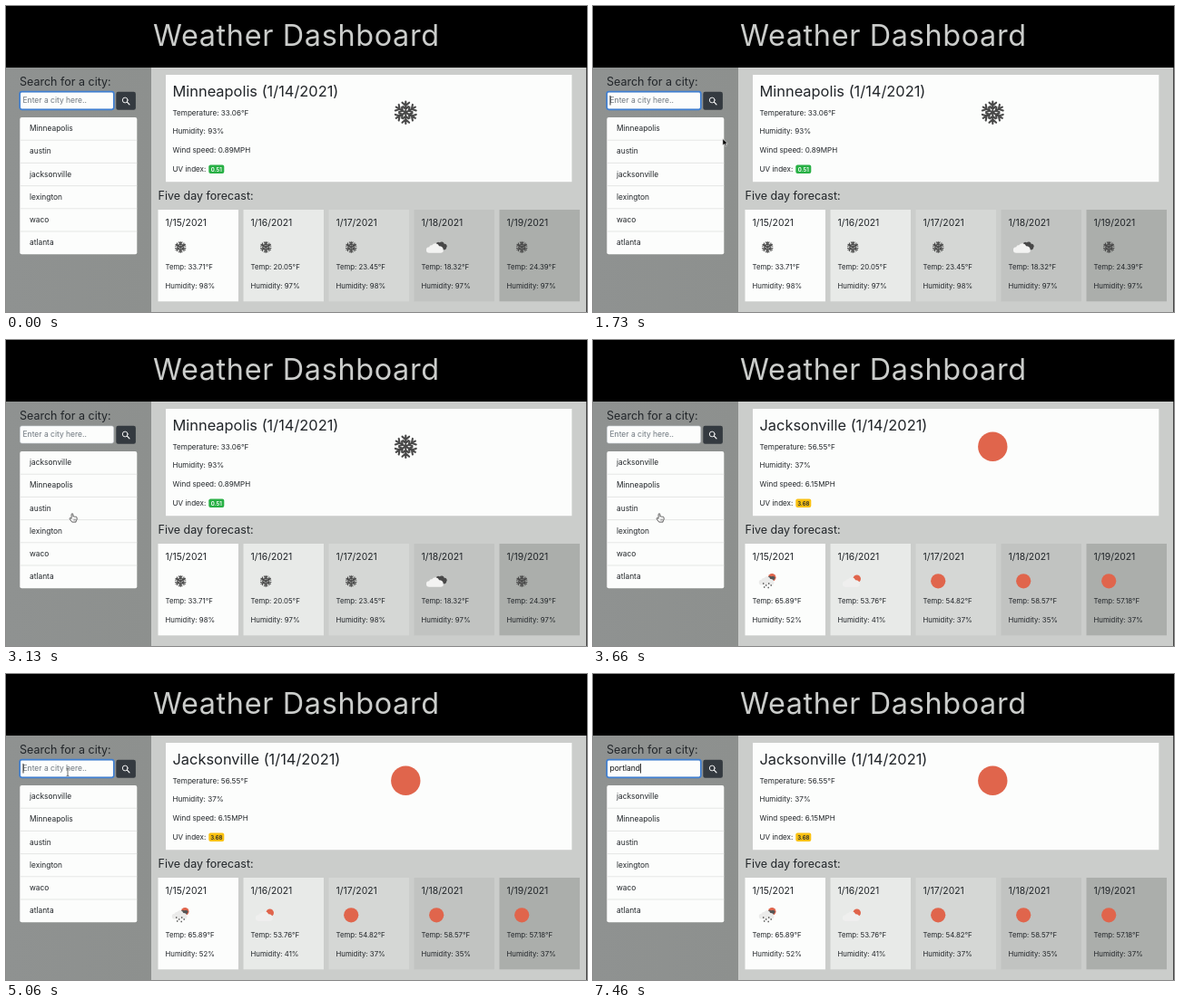
An HTML page for the animation above (8000 ms loop, 640 by 338 pixels).

```html
<!DOCTYPE html>
<html lang="en">
<head>
<meta charset="utf-8">
<title>Weather Dashboard</title>
<style>
html, body { margin: 0; width: 100%; height: 100%; overflow: hidden; background: #cbcdcb; }
svg { display: block; width: 640px; height: 338px; }
text { font-family: Inter, "Open Sans", sans-serif; font-size: 8.1px; fill: #212529; white-space: pre; }
.title { font-size: 32.4px; letter-spacing: .02em; fill: #cbcdcb; }
.city { font-size: 16.4px; }
.head { font-size: 12.5px; }
.date { font-size: 10.4px; }
.item { font-size: 8.4px; }
.day { font-size: 7.8px; }
.badge { font-size: 6.1px; font-weight: 600; text-anchor: middle; }
.hint { fill: #6c757d; font-size: 8.5px; }
.field { fill: #111; font-size: 8.5px; }
</style>
</head>
<body>
<svg viewBox="0 0 640 338">
  <defs>
    <linearGradient id="shade">
      <stop offset="0" stop-color="#8f9291"/><stop offset="1" stop-color="#8d908e"/>
    </linearGradient>
    <g id="snow" fill="none" stroke="#484848" stroke-width="2.1" stroke-linecap="round"></g>
    <circle id="sun" r="16.2" fill="#e0654c"/>
    <path id="cloud" d="M-16 13a6.5 6.5 0 0 1 0-13a5 5 0 0 1 6-4a9 9 0 0 1 16 2a8 8 0 0 1 9 8a6 6 0 0 1-5 7z"/>
    <g id="clouds">
      <path d="M-1-7a5 5 0 0 1 8-3a6 6 0 0 1 10 3a5 5 0 0 1 5 8a5 5 0 0 1-6 5h-9z" fill="#484848"/>
      <use href="#cloud" fill="#f3f3f2"/>
    </g>
    <g id="partly">
      <circle cx="9" cy="-5" r="8.6" fill="#e0654c"/>
      <use href="#cloud" fill="#efefee"/>
    </g>
    <g id="rain">
      <circle cx="10" cy="-8" r="8.6" fill="#e0654c"/>
      <path d="M1-9a6 6 0 0 1 8-1a5 5 0 0 1 8 3l-4 6h-10z" fill="#555"/>
      <use href="#cloud" fill="#ebebea" transform="translate(1 -3) scale(.88)"/>
      <path d="M-9 4v3M-3 8v3M3 4v3M-7 12v3M2 13v3M8 8v3" stroke="#484848" stroke-width="2.6"/>
    </g>
  </defs>

  <rect width="640" height="338" fill="#cbcdcb"/>
  <rect y="68" width="160" height="270" fill="url(#shade)"/>
  <rect width="640" height="68" fill="#000"/>
  <rect x="639" y="68" width="1" height="270" fill="#444"/>
  <text class="title" x="162" y="43.5">Weather Dashboard</text>

  <text class="head" x="15" y="87.5">Search for a city:</text>
  <rect x="15.5" y="95" width="103" height="19" rx="2" fill="#fcfdfc" stroke="#ced4da" stroke-width=".6"/>
  <rect id="ring" x="15.2" y="94.7" width="103.6" height="19.6" rx="2.2" fill="none" stroke="#3f7fd2" stroke-width="1.7"/>
  <text class="hint" id="hint" x="18.5" y="107.2">Enter a city here..</text>
  <text class="field" id="field" x="18.5" y="107.2"></text>
  <rect id="caret" y="99" width=".8" height="10.5" fill="#000"/>
  <rect x="121.3" y="94.7" width="21.6" height="20" rx="2.2" fill="#343a40"/>
  <g fill="none" stroke="#fff" stroke-width=".9" stroke-linecap="round">
    <circle cx="131.2" cy="104" r="2.9"/><path d="M133.4 106.2l2.6 2.6" stroke-width="1.2"/>
  </g>

  <rect x="15.3" y="123" width="129" height="151.3" rx="2" fill="#fcfdfc"/>
  <g id="list"></g>

  <rect x="176" y="76" width="447.3" height="118.2" fill="#fcfdfc"/>
  <g id="now"></g>
  <text class="head" x="167.5" y="213.8">Five day forecast:</text>
  <g id="days"></g>

  <g id="arrow"><path d="M0 0v7.4l1.8-1.6l1.2 2.6l1.3-.6l-1.2-2.5h2.4z" fill="#000" stroke="#fff" stroke-width=".6"/></g>
  <g id="hand">
    <path d="M-.9.8q.9-1.3 1.8 0v2.8q.8-.6 1.5.1q.8-.5 1.4.2q1-.3 1.3.7v2q-.3 1.3-1 2v1h-4.4l-2.5-3.4q-.4-1.2.6-1.2l1.3.9z" fill="#fff" stroke="#222" stroke-width=".7"/>
    <path d="M1.2 6v2M2.5 6v2M3.7 6v2" stroke="#222" stroke-width=".4"/>
  </g>
  <path id="beam" d="M-1.4-4.2q1.4 0 1.4 1v6.4q0 1-1.4 1M1.4-4.2q-1.4 0-1.4 1M0 3.2q0 1 1.4 1" fill="none" stroke="#333" stroke-width=".7"/>
</svg>
<script>
const $ = id => document.getElementById(id);
const LOOP = 8000;

const cities = [
  ['Minneapolis', 'austin', 'jacksonville', 'lexington', 'waco', 'atlanta'],
  ['jacksonville', 'Minneapolis', 'austin', 'lexington', 'waco', 'atlanta']
];
const reports = [
  { city: 'Minneapolis', temp: '33.06', hum: 93, wind: '0.89', uv: '0.51', tag: '#28b045', ink: '#fff', icon: 'snow',
    days: [['snow', '33.71', 98], ['snow', '20.05', 97], ['snow', '23.45', 98], ['clouds', '18.32', 97], ['snow', '24.39', 97]] },
  { city: 'Jacksonville', temp: '56.55', hum: 37, wind: '6.15', uv: '3.68', tag: '#fac111', ink: '#212529', icon: 'sun',
    days: [['rain', '65.89', 52], ['partly', '53.76', 41], ['sun', '54.82', 37], ['sun', '58.57', 35], ['sun', '57.18', 37]] }
];
const shades = ['#fcfdfc', '#e8eae8', '#d5d7d5', '#c1c3c1', '#abaeab'];

const text = (x, y, s, cls = '', extra = '') => `<text class="${cls}" x="${x}" y="${y}" ${extra}>${s}</text>`;
const icon = (id, x, y, k = 1) => `<use href="#${id}" transform="translate(${x} ${y}) scale(${k})"/>`;

// Six-armed snowflake
$('snow').innerHTML = [0, 60, 120, 180, 240, 300].map(a =>
  `<path d="M0 0V-12.2M-3.8-11l3.8 3.4l3.8-3.4M-3-6.6l3 2.7l3-2.7" transform="rotate(${a})"/>`).join('');

const listView = names => names.map((n, i) =>
  text(26, 138.2 + i * 25.2, n, 'item') +
  (i ? `<path d="M15.3 ${123 + i * 25.2}h129" stroke="#dcdddc" stroke-width=".7"/>` : '')).join('');

const nowView = (r, pic) =>
  text(183.5, 100, `${r.city} (1/14/2021)`, 'city') +
  text(183.5, 120.8, `Temperature: ${r.temp}°F`) +
  text(183.5, 141.4, `Humidity: ${r.hum}%`) +
  text(183.5, 162, `Wind speed: ${r.wind}MPH`) +
  text(183.5, 182.6, 'UV index:') +
  `<rect x="223.3" y="175.6" width="17" height="9.4" rx="2" fill="${r.tag}"/>` +
  text(231.8, 182.5, r.uv, 'badge', `style="fill:${r.ink}"`) +
  icon(pic, 440.3, 117.7);

const daysView = (r, pics) => shades.map((fill, i) => {
  const x = 167.5 + i * 94, [, temp, hum] = r.days[i];
  return `<rect x="${x}" y="225" width="88.5" height="101.3" fill="${fill}"/>` +
    text(x + 8, 243, `1/${15 + i}/2021`, 'date') +
    icon(pics.days[i][0], x + 24.7, 266.3, .5) +
    text(x + 8, 291.2, `Temp: ${temp}°F`, 'day') +
    text(x + 8, 312, `Humidity: ${hum}%`, 'day');
}).join('');

const drawn = {};
function put(id, key, view) {
  if (drawn[id] !== key) { drawn[id] = key; $(id).innerHTML = view(); }
}
const show = (id, on) => $(id).setAttribute('visibility', on ? 'visible' : 'hidden');

// Pointer path: time, x, y
const path = [
  [930, 100, 110], [1260, 150, 146], [1460, 150, 146], [1730, 143, 146.5], [2260, 74, 203.5],
  [2560, 74, 203.5], [2900, 73, 191.5], [4330, 73, 191.5], [4600, 71.5, 125.2], [4900, 68, 108.5], [LOOP, 68, 108.5]
];
function pointer(t) {
  const i = Math.max(1, path.findIndex(p => p[0] > t));
  const [a, b] = [path[i - 1], path[i]];
  const k = Math.max(0, (t - a[0]) / (b[0] - a[0]));
  return [a[1] + (b[1] - a[1]) * k, a[2] + (b[2] - a[2]) * k];
}

const word = 'portland';
const keys = [6260, 6460, 6600, 6860, 7060, 7190, 7330, 7460];
const blinks = [[460, 930], [1460, 1930], [2460, 2930], [5060, 5600], [6060, LOOP]];

function draw(t) {
  const at = ms => t >= ms ? 1 : 0;
  put('list', at(3125), () => listView(cities[at(3125)]));
  put('now', at(3400) + at(3460), () => nowView(reports[at(3400)], reports[at(3460)].icon));
  put('days', at(3530) + at(3660), () => daysView(reports[at(3530)], reports[at(3660)]));

  const typed = word.slice(0, keys.filter(k => t >= k).length);
  $('field').textContent = typed;
  show('hint', !typed);
  show('ring', t < 2990 || t >= 5000);
  show('caret', blinks.some(([a, b]) => t >= a && t < b));
  $('caret').setAttribute('x', 18.6 + (typed ? $('field').getComputedTextLength() : 0));

  const [x, y] = pointer(t);
  const live = t >= 930 && t < 6460;
  const kind = x < 119 && y > 94 && y < 115 ? 'beam' : x < 142 && y > 123 ? 'hand' : 'arrow';
  for (const id of ['arrow', 'hand', 'beam']) {
    show(id, live && id === kind);
    $(id).setAttribute('transform', `translate(${x} ${y})`);
  }
}

const start = performance.now();
function tick() {
  draw((performance.now() - start) % LOOP);
  requestAnimationFrame(tick);
}
draw(0);
requestAnimationFrame(tick);
</script>
</body>
</html>
```
